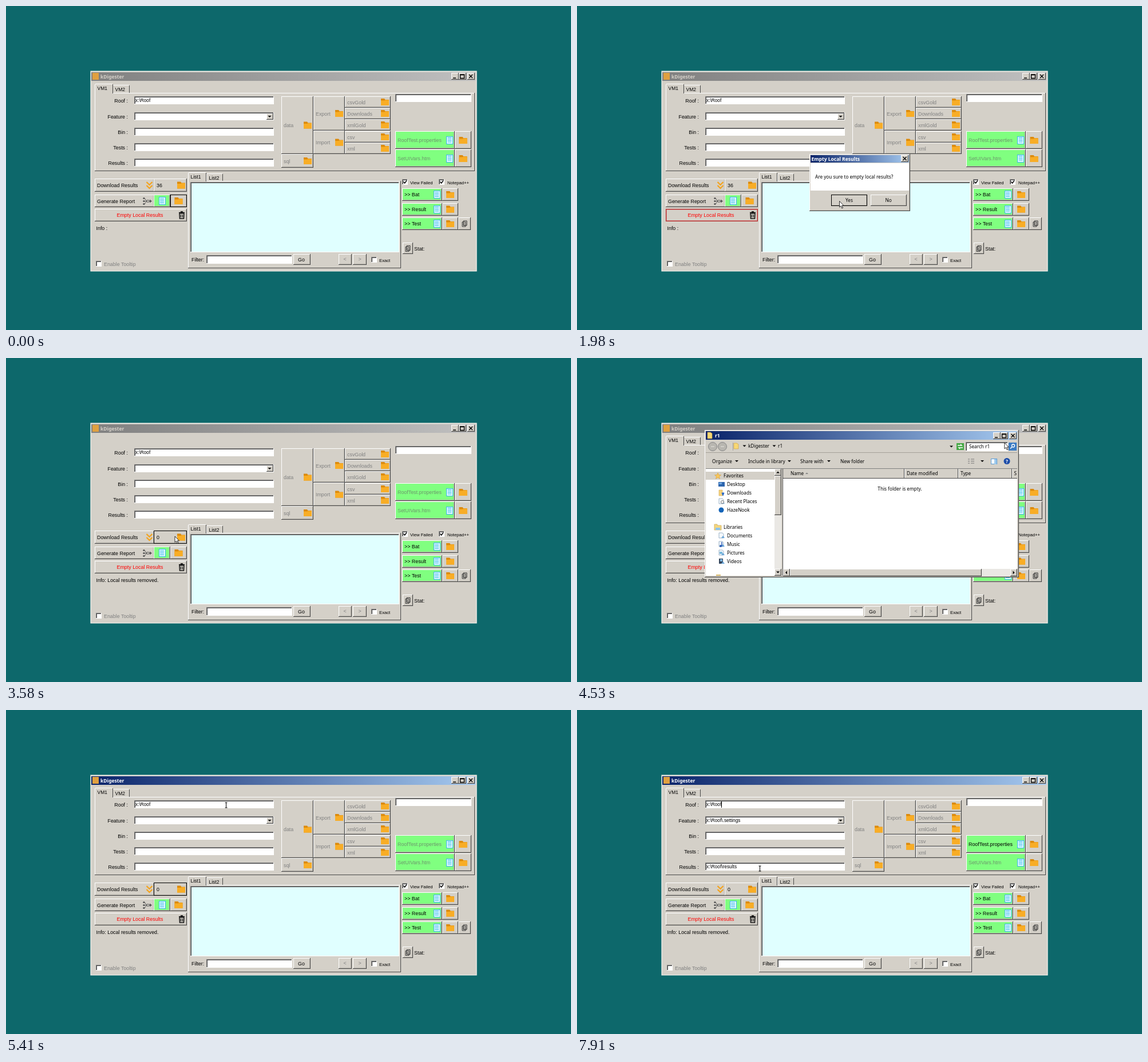
Write an HTML page that moves like this. It is 987 px wide and 567 px high and loops after 7990 ms.

```html
<!DOCTYPE html>
<html lang="en">
<head>
<meta charset="utf-8">
<title>Report window</title>
<style>
html, body { margin: 0; width: 100%; height: 100%; overflow: hidden; background: #0d686b; }
svg { position: absolute; left: 0; top: 0; }
text { white-space: pre; }
rect { shape-rendering: crispEdges; }
</style>
</head>
<body>
<svg width="987" height="567" viewBox="0 0 987 567">
  <defs>
    <linearGradient id="active"><stop stop-color="#0a246a"/><stop offset="1" stop-color="#a6caf0"/></linearGradient>
    <linearGradient id="idle"><stop stop-color="#808080"/><stop offset="1" stop-color="#c0c0c0"/></linearGradient>
    <clipPath id="leftovers"></clipPath>
  </defs>
  <g id="scene"></g>
  <g id="arrow"><path d="M.5 .5V11L3 8.8 4.8 13 6.6 12.2 4.8 8.3H8Z" fill="#fff" stroke="#000" stroke-width=".8"/></g>
  <g id="beam"><path d="M-2-4.5H2M0-4.5V4.5M-2 4.5H2" fill="none" stroke="#000"/></g>
</svg>
<script>
const LOOP = 7990, FACE = '#d4d0c8', GRAY = '#808080', DARK = '#484848', GREEN = '#80ff80';
const SANS = "'Liberation Sans',Arial,sans-serif", UI = "'Noto Sans','Open Sans',sans-serif";
const APP = 'kDigester';
const $ = id => document.getElementById(id);
const esc = s => s.replace(/&/g, '&amp;').replace(/</g, '&lt;');

// Boxes are given by their corners.
const box = (x, y, x2, y2, fill) => `<rect x="${x}" y="${y}" width="${x2 - x}" height="${y2 - y}" fill="${fill}"/>`;
const frame = (x, y, x2, y2, color) =>
  `<rect x="${x + .5}" y="${y + .5}" width="${x2 - x - 1}" height="${y2 - y - 1}" fill="none" stroke="${color}"/>`;
const path = (d, fill, stroke = 'none', w = 1) => `<path d="${d}" fill="${fill}" stroke="${stroke}" stroke-width="${w}"/>`;
const circle = (x, y, r, fill, stroke = 'none') => `<circle cx="${x}" cy="${y}" r="${r}" fill="${fill}" stroke="${stroke}"/>`;
const raised = (x, y, x2, y2, fill = FACE) =>
  box(x, y, x2, y2, DARK) + box(x, y, x2 - 1, y2 - 1, '#fff') + box(x + 1, y + 1, x2 - 1, y2 - 1, '#b4b0a8') + box(x + 1, y + 1, x2 - 2, y2 - 2, fill);
const sunken = (x, y, x2, y2, fill = '#fff') =>
  box(x, y, x2, y2, '#fff') + box(x, y, x2 - 1, y2 - 1, GRAY) + box(x + 1, y + 1, x2 - 1, y2 - 1, DARK) + box(x + 2, y + 2, x2 - 1, y2 - 1, fill);
const text = (x, cy, str, { size = 8.9, fill = '#000', anchor = 'start', font = SANS, weight = 400 } = {}) =>
  `<text x="${x}" y="${cy + size * .36}" font-size="${size}" fill="${fill}" text-anchor="${anchor}" font-family="${font}" font-weight="${weight}">${esc(str)}</text>`;
const ui = (x, cy, str, opts) => text(x, cy, str, { size: 8.2, font: UI, ...opts });
const heading = (x, cy, str, fill = '#fff') => ui(x, cy, str, { size: 8.5, weight: 700, fill });
const tri = (x, y, dx, dy) => path(dx
  ? `M${x - dx} ${y - 3}V${y + 3}L${x + dx} ${y}Z`
  : `M${x - 3} ${y - dy}H${x + 3}L${x} ${y + dy}Z`, '#000');

// Icons, placed by their centre.
const folder = (x, y) => path(`M${x - 7} ${y - 6}h6l1.5 2h6.5v10h-14Z`, '#dc8a0c') + path(`M${x - 7} ${y - 2.5}h6l1.5-1h6.5v9.5h-14Z`, '#f8ad26');
const page = (x, y) => `<rect x="${x - 5.5}" y="${y - 6.5}" width="11" height="13" fill="#e4fbff" stroke="#38b4ee"/>` +
  path([-4, -1.5, 1, 3.5].map(d => `M${x - 3.5} ${y + d}h7`).join(''), 'none', '#38b4ee');
const copies = (x, y) => path(`M${x - 2} ${y - 5}h6v8h-6ZM${x - 4} ${y - 3}h6v8h-6Z`, FACE, '#333') +
  path(`M${x - 2.5} ${y}h3M${x - 2.5} ${y + 2.5}h3`, 'none', '#333');
const trash = (x, y) => path(`M${x - 4} ${y - 3}h8l-.5 9h-7Z`, FACE, '#111', 1.5) +
  path(`M${x - 5} ${y - 4.5}h10M${x - 2} ${y - 6}h4M${x - 1.5} ${y - 1}v5M${x + 1.5} ${y - 1}v5`, 'none', '#111', 1.3);
const merge = (x, y) => path(`M${x - 8} ${y - 5}h3l4 5h8M${x - 8} ${y}h7M${x - 8} ${y + 5}h3l4-5`, 'none', '#555') +
  [-5, 0, 5].map(d => circle(x - 6, y + d, 1.5, '#555')).join('') + path(`M${x + 4} ${y - 3}l4 3-4 3Z`, '#555') + circle(x + 1, y, 2, FACE, '#555');
const chevrons = (x, y) => path([-6, 0].map(d => `M${x - 5} ${y + d}l5 5 5-5`).join(''), 'none', '#f5a31c', 2.2);
const check = (x, y, on) => sunken(x, y, x + 10, y + 10) + (on ? path(`M${x + 2.5} ${y + 4.5}l2 2.5 3.5-4.5`, 'none', '#000', 1.4) : '');

const capButtons = (xs, y) => xs.map(([kind, x]) => {
  const glyph = {
    min: `M${x + 3} ${y + 9}h5`,
    max: `M${x + 2.5} ${y + 3}h7v6.5h-7ZM${x + 2.5} ${y + 3.5}h7`,
    close: `M${x + 3.5} ${y + 3}l6 6M${x + 9.5} ${y + 3}l-6 6`
  }[kind];
  return raised(x, y, x + 13, y + 12) + path(glyph, 'none', '#000', 1.4);
}).join('');

const tab = (x, y, x2, y2, label) => box(x, y, x2, y2, FACE) + box(x, y + 1, x + 1, y2, '#fff') + box(x + 1, y, x2 - 1, y + 1, '#fff') +
  box(x2 - 1, y + 1, x2, y2, DARK) + text(x + 4.5, y + 8, label, { size: 8.5 });
const panel = (x, y, x2, y2) => box(x, y, x2, y2, DARK) + box(x, y, x2 - 1, y2 - 1, '#fff') + box(x + 1, y + 1, x2 - 1, y2 - 1, FACE);

const FIELDS = [['Roof :', 165], ['Feature :', 193], ['Bin :', 220], ['Tests :', 247], ['Results :', 274]];
const DATA = [
  ['data', 481, 158, 537, 259], ['sql', 481, 259, 537, 283], ['Export', 537, 158, 592, 218], ['Import', 537, 218, 592, 259],
  ['csvGold', 592, 158, 672, 178], ['Downloads', 592, 178, 672, 198], ['xmlGold', 592, 198, 672, 218],
  ['csv', 592, 219, 672, 239], ['xml', 592, 239, 672, 259]
];

function listPanel(ink, paper, tabs) {
  return (tabs ? panel(318, 306, 690, 459) + tab(350, 293, 379, 306, 'List2') + tab(318, 291, 350, 307, 'List1') : '') +
    sunken(322, 308, 687, 431, '#e0ffff') + text(324, 444, 'Filter:', { fill: ink }) + sunken(350, 436, 500, 451, paper) +
    raised(502, 434, 532, 453) + text(516, 443.5, 'Go', { anchor: 'middle', fill: ink }) +
    raised(581, 434, 604, 453) + text(592, 443, '<', { anchor: 'middle', fill: GRAY }) +
    raised(606, 434, 630, 453) + text(618, 443, '>', { anchor: 'middle', fill: GRAY }) +
    check(638, 439) + text(652, 445, 'Exact', { size: 7.7, fill: ink });
}

function mainWindow(s) {
  const ink = s.disabled ? GRAY : '#000', paper = s.disabled ? FACE : '#fff';
  const small = { size: 7.7, fill: ink }, value = { size: 8.3, fill: ink };
  let g = path('M147.4 113.4H822.6V464.6H147.4Z', '#ebe9e4') + box(149, 115, 821, 463, FACE) +
    box(149, 116, 820, 131, `url(#${s.active ? 'active' : 'idle'})`) +
    box(151, 117, 162, 129, '#e0a040') + heading(165, 123.5, APP, s.active ? '#fff' : FACE) +
    capButtons([['min', 778], ['max', 791], ['close', 805.5]], 117);
  if (s.tabs) g += panel(155, 152, 819, 289) + tab(186, 138, 216, 152, 'VM2') + tab(155, 136, 187, 153, 'VM1');

  const values = [s.path, s.filled && 'x:\\Roof\\.settings', '', '', s.filled && 'x:\\Roof\\results'];
  FIELDS.forEach(([label, cy], i) => {
    g += text(213, cy + .5, label, { anchor: 'end', fill: ink }) + sunken(224, cy - 7, 468, cy + 7, paper) +
      (values[i] ? text(226, cy + .5, values[i], value) : '');
  });
  g += raised(455, 188, 467, 199) + tri(460.5, 193.5, 0, 1.5);
  if (s.caret) g += box(s.caret, 160, s.caret + 1, 171, '#000');

  for (const [label, x, y, x2, y2] of DATA) {
    const cy = (y + y2) / 2;
    g += raised(x, y, x2, y2) + text(x + 4, cy + .5, label, { fill: GRAY }) + folder(x2 - 10, cy);
  }
  g += sunken(680, 154, 813, 168, paper);
  [['RoofTest.properties', 219, s.filled], ['SetUIVars.htm', 251, false]].forEach(([label, y, on]) => {
    g += raised(680, y, 784, y + 31, GREEN) + text(684, y + 16, label, { fill: on ? '#000' : '#6c946c' }) + page(775, y + 15.5) +
      raised(784, y, 813, y + 31) + folder(798.5, y + 16);
  });

  g += raised(155, 302, 259, 325) + text(159, 314, 'Download Results', { fill: ink }) + chevrons(250.5, 314) +
    raised(258, 302, 316, 325) + text(263, 314, s.count, { fill: ink }) + folder(306, 313.5) +
    raised(155, 330, 259, 352) + text(159, 341.5, 'Generate Report', { fill: ink }) + merge(247, 341.5) +
    raised(258, 330, 287, 352, GREEN) + page(272.5, 341) + raised(287, 330, 316, 352) + folder(301.5, 341) +
    raised(155, 355, 316, 377) + text(234, 366, 'Empty Local Results', { anchor: 'middle', fill: s.disabled ? GRAY : '#f00' }) + trash(307, 366);
  if (s.focus === 'report') g += frame(287, 330, 316, 352, '#000');
  if (s.focus === 'count') g += frame(258, 302, 316, 325, '#000');
  if (s.focus === 'empty') g += frame(155, 355, 316, 377, '#b42828') + frame(156, 356, 315, 376, '#d08080');
  g += text(157.5, 388.5, s.info, { fill: ink }) + check(157, 446) + text(171, 451.5, 'Enable Tooltip', { fill: GRAY });

  g += listPanel(ink, paper, true);
  g += check(692, 303, true) + text(706, 309, 'View Failed', small) + check(756, 303, true) + text(771, 309, 'Notepad++', small);
  [['>> Bat', 319], ['>> Result', 344.5], ['>> Test', 370]].forEach(([label, y]) => {
    g += raised(692, y, 762, y + 22, GREEN) + text(696, y + 11, label, { fill: ink }) + page(752.5, y + 11) +
      raised(762, y, 790, y + 22) + folder(776, y + 11);
  });
  return g + raised(790, 370, 812, 392) + copies(801, 381) + raised(693, 414, 711, 434) + copies(702, 424.5) + text(713, 425, 'Stat:', { fill: ink });
}

const dialog = () => raised(406, 259, 582, 359) + box(408, 261, 580, 274, 'url(#active)') + heading(409.5, 267.5, 'Empty Local Results') +
  capButtons([['close', 566]], 261) + box(408, 275, 580, 323, '#fff') + ui(416, 299, 'Are you sure to empty local results?') +
  raised(444, 330, 507, 350) + frame(444, 330, 507, 350, '#000') + ui(475.5, 340, 'Yes', { anchor: 'middle' }) +
  raised(513, 330, 576, 350) + ui(544, 340, 'No', { anchor: 'middle' });

function navIcon(kind, x, y) {
  const doc = path(`M${x - 4} ${y - 5}h6l2 2v7h-8Z`, '#f4f8fc', '#8aa4bc', .8) + path(`M${x} ${y + 4}l3-4 3 4Z`, '#6aa6d8');
  return {
    star: path(`M${x} ${y - 5}l1.5 3.5 4 .3-3 2.6 1 4-3.5-2.2-3.5 2.2 1-4-3-2.6 4-.3Z`, '#f6c65c', '#d89a2c', .6),
    desktop: box(x - 5, y - 4, x + 6, y + 4, '#2e66ae') + box(x - 4, y - 3, x + 1, y, '#6ca4de'),
    down: path(`M${x - 4} ${y - 5}h6v10h-6Z`, '#f5d27c', '#d0a44c', .6) + path(`M${x + 1} ${y}h4l-2 5Z`, '#2868c8', '#2868c8'),
    recent: doc + circle(x + 2, y + 1, 2.5, '#fff', '#777'),
    blue: circle(x, y, 4.5, '#1464b8'),
    library: path(`M${x - 6} ${y - 5}h5v2h7v8h-12Z`, '#f4d780', '#caa550', .7) + box(x - 4, y + 1, x + 4, y + 5, '#8cc4ee'),
    doc,
    music: doc + path(`M${x + 1} ${y - 4}v7`, 'none', '#2458b4', 1.4) + circle(x - 1, y + 3, 2, '#2458b4'),
    picture: doc + box(x - 3, y - 2, x + 2, y + 2, '#79b8dc'),
    video: path(`M${x - 4} ${y - 5}h7v9h-7Z`, '#34465c') + box(x - 2, y - 4, x + 2, y, '#7db4dc') + path(`M${x} ${y + 4}l3-4 3 4Z`, '#6aa6d8')
  }[kind];
}

function explorer() {
  let g = raised(223, 126, 772, 384) + box(225, 128, 769, 143, 'url(#active)') +
    path('M228 130h5l3 2v9h-8Z', '#f7d774', '#c89b3c', .6) + heading(241, 136, 'r1') +
    capButtons([['min', 727], ['max', 740], ['close', 755]], 130);
  g += [237, 254].map(x => circle(x, 155, 7.5, '#b8b6b0', '#888') + path(`M${x - 3} 155h6`, 'none', '#d8d6d0', 1.5)).join('') +
    path('M272.5 148v14M225 165.5H769', 'none', '#a4a098') + path('M274 149h5l3 2v8h-8Z', '#f7d774', '#c89b3c', .6) +
    tri(292.5, 154, 0, 1.5) + ui(299, 154.5, APP) + tri(344.5, 154, 0, 1.5) + ui(351, 154.5, 'r1') + tri(654, 155, 0, 1.5) +
    box(663, 149, 676, 161, '#46a846') + path('M665 153h7l-2-2M674 157h-7l2 2', 'none', '#fff', 1.4) +
    sunken(679, 147, 753, 163) + ui(685, 155, 'Search r1') + box(754, 148, 768, 162, '#3c7cc4') +
    `<circle cx="762" cy="153.5" r="2.5" fill="none" stroke="#fff" stroke-width="1.3"/>` + path('M760 155.5l-3 3', 'none', '#fff', 1.5);
  for (const [label, x, arrow] of [['Organize', 236, 279], ['Include in library', 299, 371], ['Share with', 390, 440], ['New folder', 460]])
    g += ui(x, 181, label) + (arrow ? tri(arrow, 180.5, 0, 1.5) : '');
  g += path('M683 177h3m2 0h6M683 180.5h3m2 0h6M683 184h3m2 0h6', 'none', '#777') + tri(708, 180.5, 0, 1.5) +
    `<rect x="723.5" y="176.5" width="10" height="9" fill="#fff" stroke="#5c9cd4"/>` + box(729, 177, 733, 186, '#9cc8ec') +
    circle(751, 180.5, 5.5, '#1c4ca8') + ui(751, 181, '?', { fill: '#fff', anchor: 'middle', weight: 700 });

  g += box(225, 193, 769, 194, GRAY) + box(225, 194, 345, 381, '#fff') + box(225, 199, 345, 213, FACE);
  const nav = [['Favorites', 206, 'star', 0], ['Desktop', 221, 'desktop', 6], ['Downloads', 236, 'down', 6], ['Recent Places', 251, 'recent', 6],
    ['HazeNook', 266, 'blue', 6], ['Libraries', 296, 'library', 0], ['Documents', 311, 'doc', 6], ['Music', 326, 'music', 6],
    ['Pictures', 341, 'picture', 6], ['Videos', 356, 'video', 6]];
  for (const [label, cy, icon, dx] of nav) g += ui(256 + dx, cy, label) + navIcon(icon, 246 + dx, cy);
  g += box(243, 379, 251, 381, '#d8b868') + box(345, 194, 357, 381, '#eae8e4') + raised(345, 194, 357, 206) + tri(351, 200, 0, -1.5) +
    raised(345, 206, 357, 275) + raised(345, 369, 357, 381) + tri(351, 375, 0, 1.5);

  g += box(359, 194, 769, 381, '#fff') + box(359, 194, 360, 381, DARK) + box(360, 194, 769, 211, FACE) + box(360, 210, 769, 211, DARK) +
    [571, 665, 759].map(x => box(x, 194, x + 1, 210, DARK) + box(x + 1, 194, x + 2, 210, '#fff')).join('') +
    ui(373, 202, 'Name') + path('M399 203l2.5-2.5 2.5 2.5Z', GRAY) + ui(576, 202, 'Date modified') + ui(670, 202, 'Type') + ui(763.5, 202, 'S') +
    ui(564, 229, 'This folder is empty.', { anchor: 'middle' }) + box(360, 369, 769, 382, '#eae8e4') +
    raised(360, 369, 372, 382) + tri(365.5, 375.5, -1.5) + raised(372, 369, 707, 382) + raised(757, 369, 769, 382) + tri(763, 375.5, 1.5);
  return g;
}

// Child controls that still show the closed window's pixels.
$('leftovers').innerHTML = [
  ...FIELDS.map(([, cy]) => [224, cy - 7, 468, cy + 7]),
  [481, 158, 672, 259], [481, 259, 537, 283], [680, 154, 771, 168], [680, 219, 771, 250], [680, 251, 771, 282],
  [224, 302, 316, 325], [224, 330, 316, 352], [224, 355, 316, 377], [223, 383, 270, 384],
  [692, 303, 749, 314], [756, 303, 771, 314], [692, 319, 771, 341], [692, 344, 771, 367], [692, 370, 771, 384]
].map(r => box(...r, '#000')).join('');

const closing = () => box(223, 131, 771, 384, FACE) + `<g clip-path="url(#leftovers)">${explorer()}</g>` + listPanel('#000', '#fff', false);

const STEPS = [
  [0, { active: false, tabs: true, count: '36', info: 'Info :', path: 'x:\\Roof', focus: 'report' }],
  [950, { active: true, focus: 'empty' }],
  [1110, { active: false, over: dialog }],
  [2060, { active: true, over: null, disabled: true }],
  [2140, { count: '0', info: 'Info: Local results removed.' }],
  [2220, { disabled: false }],
  [3500, { focus: 'count' }],
  [3580, { active: false, tabs: false }],
  [3660, { tabs: true }],
  [3820, { over: explorer }],
  [4930, { over: closing }],
  [5090, { over: null, active: true }],
  [5650, { focus: '', caret: 252 }],
  [6120, { caret: 0 }],
  [6660, { path: 'x:\\Roo', caret: 250 }],
  [7200, { caret: 0 }],
  [7510, { path: 'x:\\Roof', caret: 252 }],
  [7590, { filled: true }]
];

const POINTER = [
  [70, 858, 523], [150, 690, 482], [310, 290, 387], [470, 289, 385], [950, 272, 366], [1110, 275, 366], [1980, 458, 341],
  [2380, 457, 340], [2800, 360, 271], [3100, 266, 287], [3340, 287, 308], [3500, 294, 311], [3660, 295, 312],
  [4500, 746, 148], [4930, 761, 137], [5010, 760, 136], [5090, 722, 148], [5250, 560, 174], [5480, 339, 164.5],
  [7430, 339, 164.5], [7850, 319.5, 277.5]
];

function pointerAt(t) {
  const i = POINTER.findIndex(p => p[0] > t);
  if (i < 0) return POINTER[POINTER.length - 1].slice(1);
  const [t0, x0, y0] = POINTER[Math.max(0, i - 1)], [t1, x1, y1] = POINTER[i];
  const u = Math.max(0, (t - t0) / (t1 - t0 || 1)), e = u * u * (3 - 2 * u);
  return [x0 + (x1 - x0) * e, y0 + (y1 - y0) * e];
}

let shown = -1, state;
function draw(now) {
  const t = now % LOOP;
  const step = STEPS.filter(([at]) => at <= t).length;
  if (step !== shown) {
    shown = step;
    state = Object.assign({}, ...STEPS.slice(0, step).map(s => s[1]));
    $('scene').innerHTML = mainWindow(state) + (state.over ? state.over() : '');
  }
  // The pointer advances about every 80 ms.
  const [x, y] = pointerAt(Math.floor((t + 16) / 79.6) * 79.6);
  const inField = !state.over && x > 224 && x < 468 && FIELDS.some(([, cy]) => Math.abs(y - cy) < 7);
  $('arrow').style.display = t >= 70 && !inField ? '' : 'none';
  $('beam').style.display = t >= 70 && inField ? '' : 'none';
  for (const id of ['arrow', 'beam']) $(id).setAttribute('transform', `translate(${x.toFixed(1)} ${y.toFixed(1)})`);
}

const start = performance.now();
function tick() {
  draw(performance.now() - start);
  requestAnimationFrame(tick);
}
tick();
</script>
</body>
</html>
```
